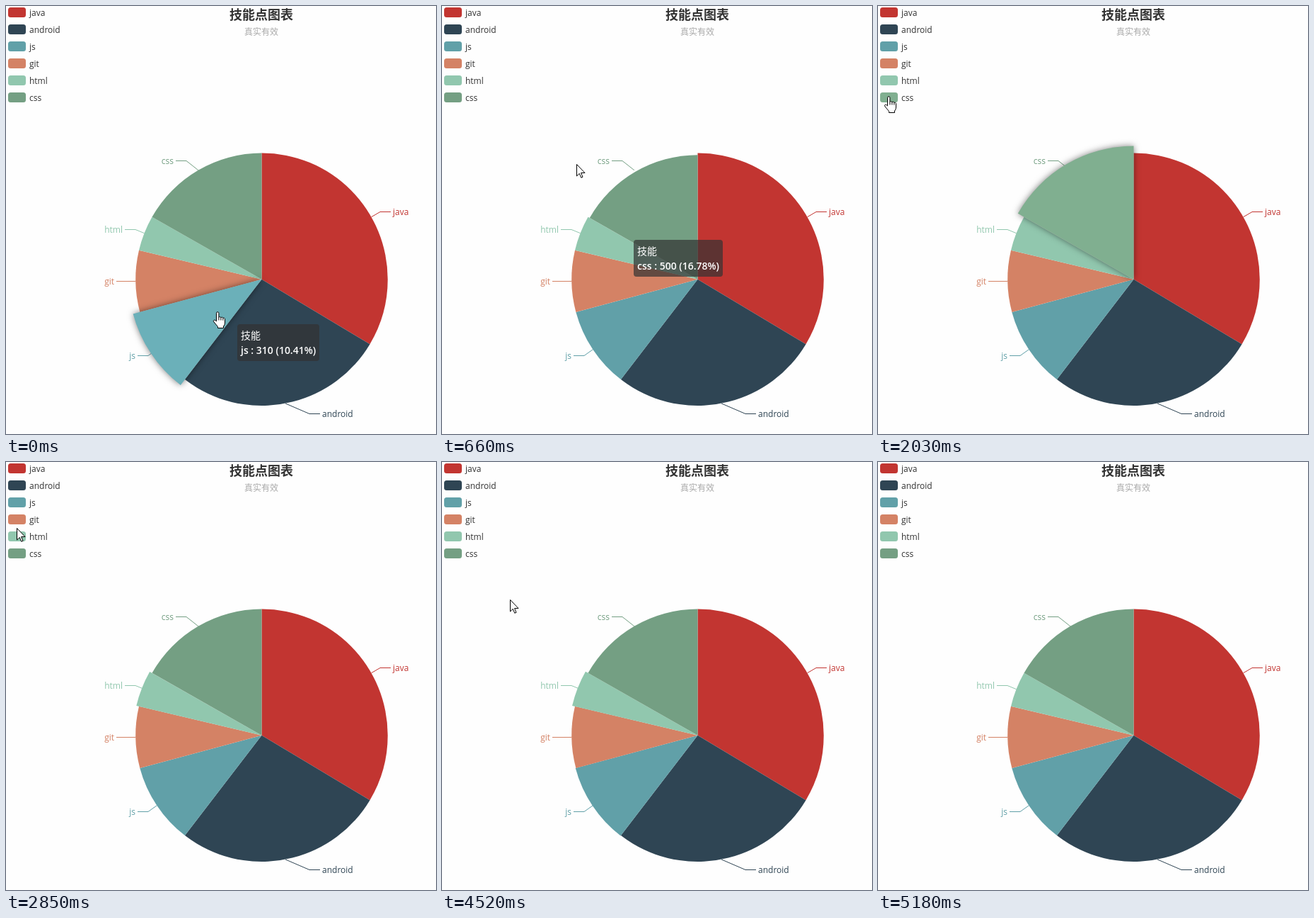
Write an HTML page with a canvas that moves like this. It is 608 px wide and 604 px high and loops after 6110 ms.

```html
<!DOCTYPE html>
<html lang="zh">
<head>
<meta charset="utf-8">
<title>技能点图表</title>
<style>
  html, body { margin: 0; width: 100%; height: 100%; overflow: hidden; background: #fefefe; }
  canvas { display: block; }
</style>
</head>
<body>
<canvas id="chart" width="608" height="604"></canvas>
<script>
const ctx = document.getElementById('chart').getContext('2d');
const LOOP = 6110, TICK = 136.3, HIDE_DELAY = 190, TAU = Math.PI * 2;
const CX = 361.5, CY = 385.75, R = 178.25, LIFT = 10;
const FONT = '"Open Sans", "Noto Sans CJK SC", "Noto Sans CJK", sans-serif';
const CJK = '"Noto Sans CJK SC", "Noto Sans CJK", sans-serif';

// elbow: x of the bend in the label line
const slices = [
  { name: 'java', value: 1000, rgb: [194, 53, 49], elbow: 529 },
  { name: 'android', value: 800, rgb: [47, 69, 84], elbow: 429 },
  { name: 'js', value: 310, rgb: [97, 160, 168], elbow: 201 },
  { name: 'git', value: 234, rgb: [212, 130, 101], elbow: 171 },
  { name: 'html', value: 135, rgb: [145, 199, 174], elbow: 183 },
  { name: 'css', value: 500, rgb: [116, 159, 131], elbow: 255 }
];
const total = slices.reduce((sum, s) => sum + s.value, 0);
let angle = -Math.PI / 2;
for (const s of slices) {
  s.start = angle;
  s.end = angle += s.value / total * TAU;
}

// Hovering the pie opens a tooltip; hovering the legend lights its icon
const hovers = [
  { name: 'js', on: -150, off: 480, tip: [318, 453] },
  { name: 'css', on: 540, off: 621, tip: [265, 314] },
  { name: 'css', on: 1220, off: 2100 },
  { name: 'html', on: 2150, off: 2844 },
  { name: 'git', on: 2900, off: 3760 },
  { name: 'js', on: 3800, off: 4378 },
  { name: 'html', on: 4430, off: 4478 },
  { name: 'android', on: 4720, off: 4860, tip: [476, 526] }
];
const tips = hovers.filter(h => h.tip);
tips.forEach((h, i) => { h.from = i ? tips[i - 1].tip : [413, 411]; });

// Pointer path: time, x, y
const path = [
  [0, 292, 431], [409, 287, 420], [545, 238, 287], [681, 190, 223], [954, 66, 155],
  [1227, 14, 134], [2045, 8, 127], [2181, 6, 109], [2726, 8, 101], [2862, 15, 93],
  [3135, 11, 82], [3680, 11, 73], [4089, 10, 57], [4362, 17, 61], [4498, 96, 194],
  [4634, 174, 296], [4907, 545, 548], [5043, 700, 600]
];

const arrow = new Path2D('M.5 .5V17L4.3 13.4 6.8 19.3 9 18.3 6.6 12.5H12z');
const hand = new Path2D('M5.5 13.5V2.5a1.7 1.7 0 0 1 3.4 0V8.5a1.6 1.6 0 0 1 3 .5a1.6 1.6 0 0 1 3 .7' +
  'a1.5 1.5 0 0 1 2.6 1V16q0 3-2 5v2.5H7.5v-2L2 15q-1.5-2 .3-2.8q1.4-.5 3.2 1.8z' +
  'M8.9 8.5v4M11.9 9v3.5M14.9 9.7v3');

const color = (rgb, hot) => `rgb(${rgb.map(c => Math.min(255, Math.round(c * (hot ? 1.1 : 1))))})`;
const mix = (a, b, k) => a + (b - a) * k;
const quintOut = k => 1 - (1 - Math.min(1, k)) ** 5;

function elastic(k) {
  if (k <= 0) return 0;
  if (k >= 1) return 1;
  return 2 ** (-10 * k) * Math.sin((k - 0.1) * TAU / 0.4) + 1;
}

function pointerAt(t) {
  const i = path.findIndex(p => p[0] > t);
  if (i < 0) return path.at(-1).slice(1);
  const [t0, x0, y0] = path[i - 1], [t1, x1, y1] = path[i];
  const k = (t - t0) / (t1 - t0);
  return [Math.round(mix(x0, x1, k)), Math.round(mix(y0, y1, k))];
}

function radius(s, t) {
  let lift = 0;
  for (const { name, on, off } of hovers) {
    if (name !== s.name || t < on) continue;
    lift = mix(lift, LIFT, elastic((Math.min(t, off) - on) / 300));
    lift = mix(lift, 0, elastic((t - off) / 300));
  }
  return R + lift;
}

function text(str, x, y, fill, font, align = 'left') {
  ctx.font = font;
  ctx.fillStyle = fill;
  ctx.textAlign = align;
  ctx.fillText(str, x, y);
}

function box(x, y, w, h, r, fill) {
  ctx.fillStyle = fill;
  ctx.beginPath();
  ctx.roundRect(x, y, w, h, r);
  ctx.fill();
}

function drawLabel(s) {
  const mid = (s.start + s.end) / 2, dx = Math.cos(mid), dy = Math.sin(mid);
  const side = dx > 0 ? 1 : -1, y = Math.floor(CY + (R + 15) * dy) + 0.5;
  ctx.strokeStyle = color(s.rgb);
  ctx.lineWidth = 1;
  ctx.beginPath();
  ctx.moveTo(CX + R * dx, CY + R * dy);
  ctx.lineTo(s.elbow, y);
  ctx.lineTo(s.elbow + 15 * side, y);
  ctx.stroke();
  text(s.name, s.elbow + 18 * side, y + 4.5, color(s.rgb), '12px ' + FONT, side > 0 ? 'left' : 'right');
}

function drawSlice(s, t, hot) {
  ctx.save();
  if (hot) {
    ctx.shadowBlur = 10;
    ctx.shadowColor = 'rgba(0,0,0,.5)';
  }
  ctx.fillStyle = color(s.rgb, hot);
  ctx.beginPath();
  ctx.moveTo(CX, CY);
  ctx.arc(CX, CY, radius(s, t), s.start, s.end);
  ctx.closePath();
  ctx.fill();
  ctx.restore();
}

function drawLegend(s, i, lit) {
  box(3, 2 + 24 * i, 25, 14, 3.5, color(s.rgb, lit));
  text(s.name, 33, 14 + 24 * i, '#333', '12px ' + FONT);
}

function drawTip({ name, on, from, tip }, t) {
  const { value } = slices.find(s => s.name === name);
  const k = quintOut((t - on) / 400);
  const [x, y] = from.map((a, i) => Math.round(mix(a, tip[i], k)));
  const line = `${name} : ${value} (${(value / total * 100).toFixed(2)}%)`;
  const font = '600 14px ' + FONT;
  ctx.font = font;
  box(x, y, Math.round(ctx.measureText(line).width) + 10, 52, 4, 'rgba(50,50,50,.7)');
  text('技能', x + 5, y + 21, '#fff', '500 14px ' + CJK);
  text(line, x + 5, y + 42, '#fff', font);
}

function drawPointer([x, y], shape) {
  ctx.save();
  ctx.translate(x, y);
  ctx.fillStyle = '#fff';
  ctx.strokeStyle = '#000';
  ctx.lineWidth = 1;
  ctx.fill(shape);
  ctx.stroke(shape);
  ctx.restore();
}

function draw(now) {
  // the picture advances in even ticks
  const t = Math.floor((now + 25) / TICK) * TICK;
  const hover = hovers.find(h => t >= h.on && t < h.off);
  const isHot = s => hover?.name === s.name;
  const tip = tips.findLast(h => t >= h.on && t < h.off + HIDE_DELAY);

  ctx.fillStyle = '#fefefe';
  ctx.fillRect(0, 0, 608, 604);
  text('技能点图表', 361, 19, '#333', 'bold 18px ' + CJK, 'center');
  text('真实有效', 361, 41, '#aaa', '12px ' + CJK, 'center');
  slices.forEach((s, i) => drawLegend(s, i, isHot(s) && !hover.tip));
  slices.forEach(drawLabel);
  [...slices].sort((a, b) => isHot(a) - isHot(b)).forEach(s => drawSlice(s, t, isHot(s)));
  if (tip) drawTip(tip, t);
  drawPointer(pointerAt(t), hover ? hand : arrow);
}

const begin = performance.now();
function frame() {
  draw((performance.now() - begin) % LOOP);
  requestAnimationFrame(frame);
}
frame();
</script>
</body>
</html>
```
